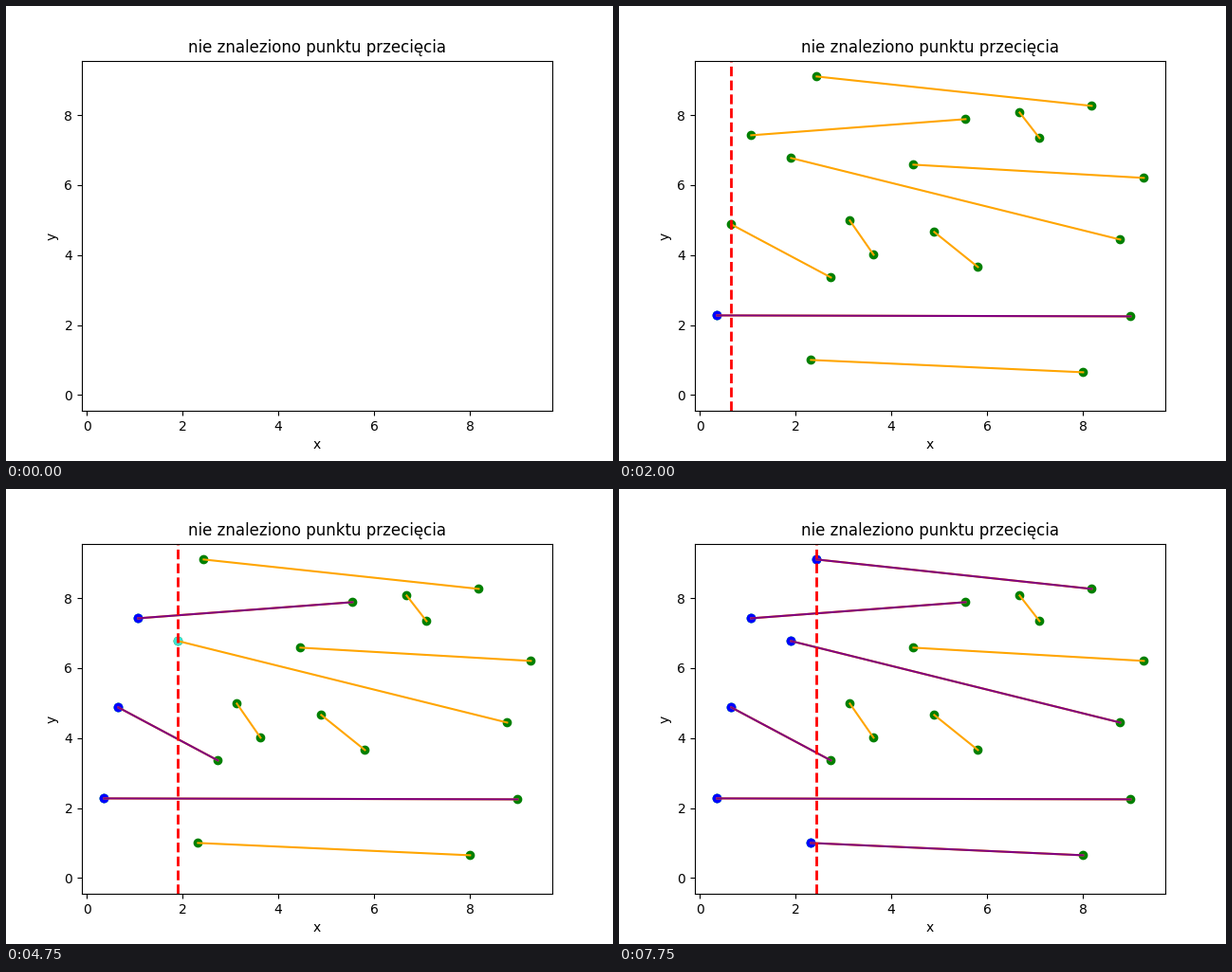
Write a matplotlib script that moves like this. It is 640 px wide and 480 px high and loops after 8 s.

```python
import matplotlib.pyplot as plt
from matplotlib.animation import FuncAnimation

STEP_MS = 250
FRAMES = 32
EVENTS = 6
FIRST_EVENT = 3
EVENT_STEPS = 5

# Segments as (x1, y1, x2, y2), ordered by left end.
SEGMENTS = [
    (0.363, 2.275, 8.995, 2.248),
    (0.660, 4.875, 2.740, 3.359),
    (1.076, 7.421, 5.550, 7.882),
    (1.908, 6.771, 8.778, 4.442),
    (2.323, 1.002, 8.005, 0.650),
    (2.442, 9.101, 8.184, 8.261),
    (3.135, 4.984, 3.630, 4.009),
    (4.462, 6.582, 9.273, 6.203),
    (4.897, 4.659, 5.808, 3.657),
    (6.679, 8.071, 7.095, 7.340),
]

plt.rcParams["font.family"] = "DejaVu Sans"
fig, ax = plt.subplots(figsize=(6.4, 4.8), dpi=100)
ax.set_title("nie znaleziono punktu przecięcia")
ax.set_xlabel("x")
ax.set_ylabel("y")
ax.set_xlim(-0.1, 9.72)
ax.set_ylim(-0.455, 9.555)

timeline = []  # (artist, first step, step at which it disappears)


def show(artist, start, stop=FRAMES):
    timeline.append((artist, start, stop))


def add_dots(xs, ys, color, start):
    show(ax.scatter(xs, ys, color=color), start)


def add_segment(segment, color, start):
    x1, y1, x2, y2 = segment
    show(ax.plot([x1, x2], [y1, y2], color=color)[0], start)


xs = [x for s in SEGMENTS for x in s[::2]]
ys = [y for s in SEGMENTS for y in s[1::2]]
add_dots(xs, ys, "green", 1)
for segment in SEGMENTS:
    add_segment(segment, "orange", 2)

# Each event: sweep line, highlighted point, active segment, visited point.
for k, segment in enumerate(SEGMENTS[:EVENTS]):
    start = FIRST_EVENT + EVENT_STEPS * k
    x, y = segment[:2]
    sweep = ax.axvline(x, color="red", linestyle="--", linewidth=2)
    show(sweep, start, start + 4)
    add_dots([x], [y], "turquoise", start + 1)
    add_segment(segment, "purple", start + 2)
    add_dots([x], [y], "blue", start + 3)


def update(step):
    for artist, start, stop in timeline:
        artist.set_visible(start <= step < stop)
    return [artist for artist, _, _ in timeline]


anim = FuncAnimation(fig, update, frames=FRAMES, interval=STEP_MS,
                     repeat=True, repeat_delay=0, blit=False)
plt.show()
```
